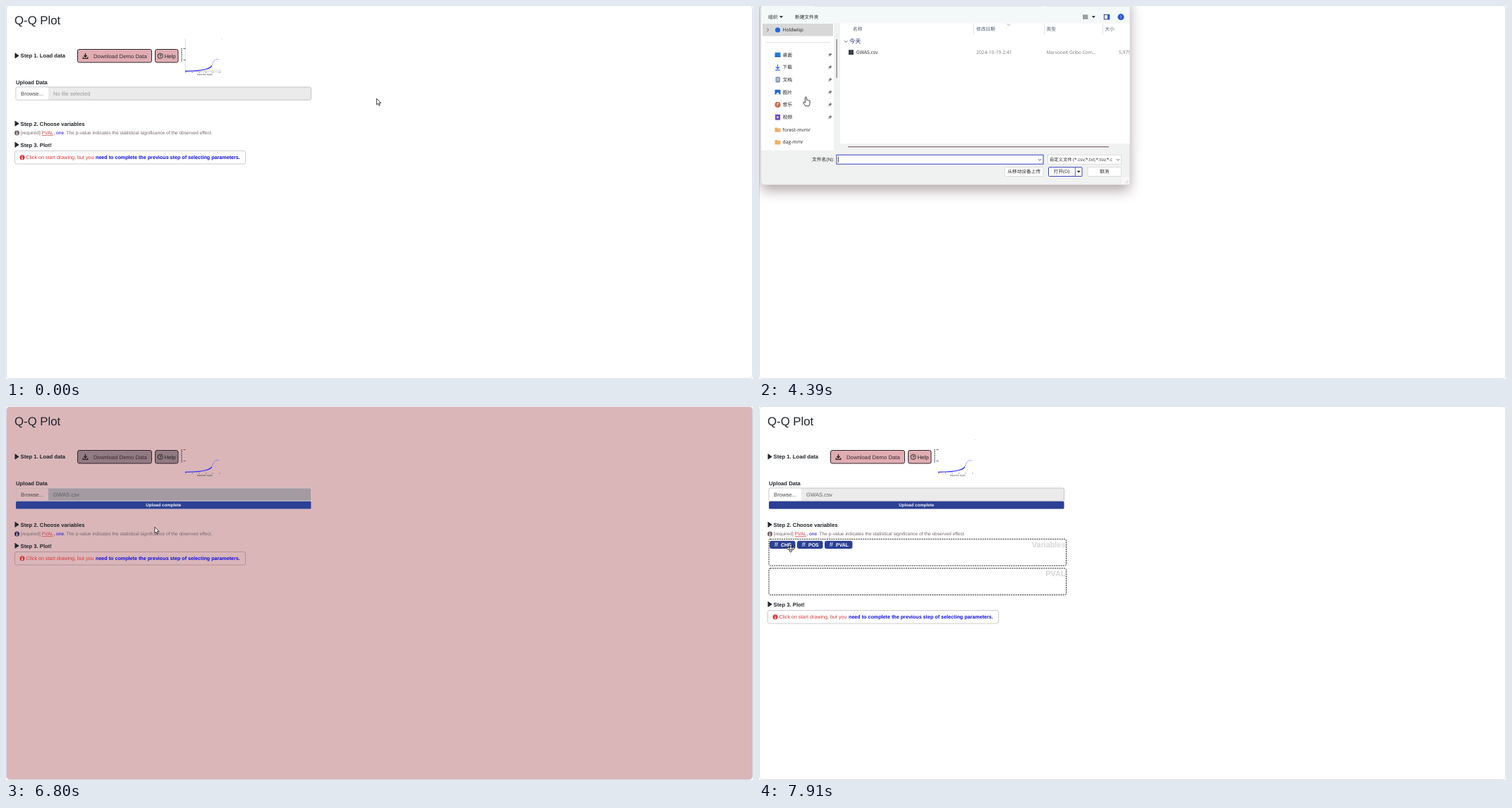
Animation, 1059 px wide and 529 px high, one loop 8 s. Source, as an HTML page:

```html
<!DOCTYPE html>
<html lang="zh-CN">
<head>
<meta charset="utf-8">
<title>Q-Q Plot</title>
<style>
html, body { margin: 0; width: 100%; height: 100%; overflow: hidden; background: #fff; }
svg { display: block; width: 100vw; height: 100vh; }
text { font: 7.7px "Liberation Sans", Arial, sans-serif; fill: #212529; text-rendering: geometricPrecision; white-space: pre; }
.b { font-weight: bold; }
#card { fill: var(--card); stroke: #dcdde0; }
.btn { fill: var(--btn); stroke: #33262b; }
.btnText { font-size: 7.75px; fill: #3a2a30; }
.field { fill: var(--field); stroke: #c4c4c6; }
.tip text { font-size: 6.63px; fill: #77666a; }
.note text { font-size: 7.18px; }
.note .red, .tip .red { fill: #dc3535; }
.note .blue, .tip .blue { fill: #0b0be0; }
.drop { fill: none; stroke: #222; stroke-dasharray: 2 1.2; }
.drop + text { font-size: 10.9px; font-weight: bold; fill: var(--label); text-anchor: end; }
.chip rect { fill: #2c4094; }
.chip text { fill: #fff; font-size: 7px; font-weight: bold; }
.chip .hash { font-size: 9.5px; font-weight: normal; }
.ui text { font: 6.8px "Open Sans", "Noto Sans CJK SC", "Noto Sans CJK", sans-serif; fill: #222; }
.ui .cjk { font-size: 6.7px; }
.ui .dim { fill: #777; }
.ui .head { fill: #4c5a70; font-size: 6.7px; }
.ui .mid { text-anchor: middle; font-size: 6.7px; }
.line { fill: none; stroke: #444; stroke-width: .8; }
.box { fill: #fff; stroke: #d5d5d5; stroke-width: .8; }
.focus { stroke: #3445b5; stroke-width: 1; }
#dialog { transform-origin: 264px 120px; filter: drop-shadow(0 8px 9px rgba(70, 45, 50, .42)); }
#popup { filter: drop-shadow(0 4px 6px rgba(0, 0, 0, .28)); }
.pointer { fill: #fff; stroke: #111; stroke-width: .8; stroke-linejoin: round; }
</style>
</head>
<body>
<svg viewBox="0 0 1059 529" preserveAspectRatio="none">
  <defs>
    <path id="play" d="M12.5 -3.6Q12.5 -4.2 13.1 -3.8L18 -.5Q18.6 0 18 .5L13.1 3.8Q12.5 4.2 12.5 3.6Z" fill="#212529"/>
    <g id="info">
      <circle r="3.5"/>
      <path d="M0 -2.2V-1.2M-.8 -.2H.1V1.9M-1 1.9H1" fill="none" stroke="#fff" stroke-width=".9"/>
    </g>
    <path id="down" d="M-2.2 -1.1L0 1.1 2.2 -1.1" class="line"/>
    <path id="caret" d="M-2.6 -1.3H2.6L0 1.5Z" fill="#222"/>
    <path id="pin" d="M-2.5 2.5L-.8 .8M-1.8 -.6L1 2.1M-.9 -.4L1 -2.3 2.6 -.7 .8 1.1Z" fill="#777" stroke="#777" stroke-width=".8"/>
    <path id="folder" d="M-4 -3H-.8L.3 -2H4V3.3H-4Z" fill="#f2b06a"/>
  </defs>

  <rect id="card" x=".5" y="-.5" width="1058" height="529" rx="5"/>
  <text x="12" y="26" style="font-size:16.8px">Q-Q Plot</text>

  <use href="#play" y="70.4"/>
  <text class="b" x="20.5" y="73.2">Step 1. Load data</text>
  <rect class="btn" x="101.5" y="61.5" width="105" height="18.5" rx="2.5"/>
  <path d="M112.5 67V71.8M110.4 70L112.5 72.2 114.6 70M109.3 72.2V74.4H115.8V72.2" fill="none" stroke="#2b2226" stroke-width="1.3"/>
  <text class="btnText" x="124" y="73.7">Download Demo Data</text>
  <rect class="btn" x="211.5" y="61.5" width="32.5" height="18.5" rx="2.5"/>
  <circle cx="218.7" cy="70.8" r="3.6" fill="none" stroke="#222" stroke-width=".9"/>
  <text class="b" x="216.9" y="73" style="font-size:6px">?</text>
  <text class="btnText" x="224.7" y="73.7" style="fill:#222">Help</text>

  <g id="thumb">
    <path id="axes" d="M254.3 46V93.5H306M254 93L305 91" fill="none" stroke="#c9c9cd" stroke-width=".7"/>
    <path d="M254 92.3Q275 92.3 283 89.8T291.5 85" fill="none" stroke="#2a2aff" stroke-width="1.2"/>
    <path d="M291.5 85L294 79.5Q296 75.8 298 75.8H302" fill="none" stroke="#3a3aff" stroke-dasharray="1 1.3"/>
    <path d="M249 60V79" stroke="#444" stroke-width="1.3" stroke-dasharray="1.6 1"/>
    <path d="M251.5 60.5H254.5M251.5 76.5H254.5" stroke="#555" stroke-width=".9"/>
    <path d="M254 94H305" stroke="#666" stroke-width=".9" stroke-dasharray="1.4 8.2"/>
    <rect x="305.3" y="45.8" width="1" height=".8" fill="#aaa"/>
    <text x="271" y="97.8" style="font-size:2.9px">Expected -log(P)</text>
  </g>

  <text class="b" x="14" y="111.3">Upload Data</text>
  <rect class="field" x="14" y="115" width="418.5" height="18.2" rx="2"/>
  <rect x="14.5" y="115.5" width="45.5" height="17.2" rx="1.5" fill="var(--card)"/>
  <text x="21" y="126.9" style="fill:#44484c">Browse...</text>
  <text id="file" x="67" y="126.9"></text>

  <g id="upload">
    <rect x="14" y="133.7" width="418.5" height="10.8" rx="2" fill="#f1f1f1"/>
    <rect id="bar" x="14" y="133.7" height="10.8" rx="1.5" fill="#2c4094"/>
    <text id="done" class="b" y="141.4" text-anchor="middle" style="font-size:6.2px;fill:#f4f2f6">Upload complete</text>
  </g>
  <g id="import">
    <rect x="191" y="161.2" width="64.5" height="19.3" rx="3" fill="#0b12fb"/>
    <text x="223.2" y="174.5" text-anchor="middle" style="font-size:11.3px;fill:#fff;stroke:#fff;stroke-width:.25px">Import</text>
  </g>

  <g id="step2">
    <use href="#play" y="166.8"/>
    <text class="b" x="20.5" y="169.6">Step 2. Choose variables</text>
    <g class="tip">
      <use id="tipIcon" href="#info" x="15.5" y="180"/>
      <text x="20.8" y="182.3">[required]</text>
      <text class="red" x="50.6" y="182.3" text-decoration="underline">PVAL</text>
      <text class="blue" x="67.4" y="182.3">, one</text>
      <text x="82" y="182.3">. The p-value indicates the statistical significance of the observed effect.</text>
    </g>
  </g>

  <g id="vars">
    <rect class="drop" x="14" y="187.3" width="421.5" height="37.8" rx="2"/>
    <text x="434.5" y="198.7">Variables</text>
    <rect class="drop" x="14" y="228.7" width="421.5" height="37.8" rx="2"/>
    <text x="434.5" y="240.2">PVAL</text>
    <g id="chips" class="chip"></g>
  </g>

  <g id="step3">
    <use href="#play" y="196.8"/>
    <text class="b" x="20.5" y="199.5">Step 3. Plot!</text>
    <rect x="12.5" y="205.5" width="327" height="18.5" rx="2.5" fill="none" stroke="#000" stroke-opacity=".2"/>
    <g class="note">
      <use href="#info" x="23" y="214.8" fill="#dc3535"/>
      <text class="red" x="28.5" y="217.2">Click on start drawing, but you</text>
      <text class="blue b" x="127" y="217.2">need to complete the previous step of selecting parameters.</text>
    </g>
  </g>

  <g id="status" class="ui">
    <path d="M0 517H297Q299.7 517 299.7 519.5V529H0Z" fill="#cdcdd1"/>
    <text x="4" y="525.2" fill="#333">app.invalid:7700/visits/bd05cf91e6b2278e119c5d8b04f62c17/samples/fetch_sample_file?k=</text>
  </g>

  <g id="popup" class="ui">
    <rect x="789" y="-12" width="199.5" height="59" rx="4" fill="#fff"/>
    <path d="M789 16H988.5" stroke="#f0f0f0"/>
    <text class="b" x="798" y="8.8" style="font-size:7.7px;font-weight:bold">下载</text>
    <path class="line" d="M916.8 2.7H920L921.2 3.8H925V9.8H916.8ZM941.9 10L939.6 7.6M971.2 9.5L973 7.7M971.4 5.8L974.9 9.3 975.7 7.2 978.2 5.2 975.5 2.5 973.5 5Z"/>
    <circle class="line" cx="937.6" cy="5.5" r="2.8"/>
    <path d="M952.8 6H960" stroke="#333" stroke-width="1.5" stroke-dasharray="1.5 1.4"/>
    <rect x="798.3" y="27.5" width="6.5" height="6.5" fill="#3a4048"/>
    <text x="811" y="29.2">GWAS.csv</text>
    <text x="811" y="37.7" text-decoration="underline" style="font-size:5.6px;fill:#2b58c0">打开文件</text>
  </g>

  <g id="dialog" class="ui">
    <rect x="3" y="-14" width="522.5" height="267.5" rx="5" fill="#f0f1f1"/>
    <rect x="3" y="0" width="522.5" height="24.5" fill="#f3f8f8"/>
    <path d="M78 .3H401M406 .3H525" stroke="#dfe3e4" stroke-width=".8"/>
    <text class="cjk" x="13" y="18.2">组织</text>
    <use href="#caret" x="31.5" y="15.6"/>
    <text class="cjk" x="51" y="18.2">新建文件夹</text>
    <path d="M459 13.2H466.3M459 15.5H466.3M459 17.8H466.3" stroke="#333" stroke-width="1"/>
    <use href="#caret" x="474.3" y="15.6"/>
    <rect x="489.3" y="12.3" width="7.5" height="6.5" fill="#fff" stroke="#26386f"/>
    <rect x="494" y="12.3" width="2.8" height="6.5" fill="#2f62d8"/>
    <circle cx="513" cy="15.6" r="4.5" fill="#2a55d2"/>
    <text x="511.5" y="18" style="font-size:6px;fill:#fff">?</text>

    <rect x="3" y="24.5" width="103" height="180" fill="#fff"/>
    <rect x="5" y="25" width="100" height="17.6" fill="#d8d8d9"/>
    <path class="line" d="M11.4 31.8L13.6 34 11.4 36.2"/>
    <circle cx="26.5" cy="34" r="3.6" fill="#2468d0"/>
    <text x="33.5" y="36.3">Holdwisp</text>
    <path d="M10 51.8H101" stroke="#ddd"/>
    <g id="places"></g>
    <path d="M110.2 47V102" stroke="#725a5c"/>

    <rect x="115" y="24.5" width="410.5" height="170.8" fill="#fff"/>
    <text class="head" x="133" y="35">名称</text>
    <text class="head" x="308" y="35">修改日期</text>
    <text class="head" x="407.5" y="35">类型</text>
    <text class="head" x="490.5" y="35">大小</text>
    <path d="M304.5 25V40.5M404.5 25V40.5M487.5 25V40.5" stroke="#e2e4e6"/>
    <use href="#down" x="354" y="26.5" opacity=".6"/>
    <use href="#down" x="123.3" y="50.2"/>
    <text x="128" y="53" style="font-size:8.4px;fill:#1f2f6e">今天</text>
    <rect x="127" y="62.2" width="7" height="7" fill="#3a4048"/>
    <text x="137.8" y="68.2">GWAS.csv</text>
    <text class="dim" x="308" y="68.2">2024-10-19 2:41</text>
    <text class="dim" x="407.5" y="68.2" style="font-size:6.5px">Marvonelt Gribo Com...</text>
    <svg x="500" y="58" width="25.5" height="14"><text class="dim" x="10" y="10.2">5,979 KB</text></svg>
    <path d="M126 199.8H496" stroke="#6d4a4d" stroke-width="1.1"/>

    <text x="75" y="220">文件名(N):</text>
    <rect class="box focus" x="110" y="211.2" width="293" height="13"/>
    <path d="M112.6 213.5V222" stroke="#222" stroke-width=".8"/>
    <use href="#down" x="398" y="218"/>
    <rect class="box" x="409.5" y="211.2" width="104" height="13"/>
    <text x="412" y="220" style="font-size:6.3px">自定义文件 (*.csv;*.txt;*.tsv;*.c</text>
    <use href="#down" x="508.8" y="218"/>
    <rect class="box" x="348.5" y="228.7" width="54.5" height="12.8" rx="1"/>
    <text class="mid" x="375.7" y="237.4">从移动设备上传</text>
    <rect class="box focus" x="410.5" y="228.7" width="47.5" height="12.8" rx="1"/>
    <path d="M448.3 229V241.5" stroke="#3445b5" stroke-width=".8"/>
    <text class="mid" x="429" y="237.4">打开(O)</text>
    <use href="#caret" x="453.2" y="235"/>
    <rect class="box" x="466" y="228.7" width="47.5" height="12.8" rx="1"/>
    <text class="mid" x="489.6" y="237.4">取消</text>
    <rect x="514" y="243" width="11" height="10" fill="#f8f8f8"/>
    <path d="M519 251.5L523.5 247M521.5 251.5L523.5 249.5" stroke="#bbb" stroke-width=".8"/>
  </g>

  <g id="pointer">
    <path id="arrow" class="pointer" d="M.4 .3V9L2.4 7.2 3.8 10.2 5.2 9.5 3.9 6.6H6.6Z"/>
    <path id="hand" class="pointer" d="M-1.1 7V1Q-1.1 0 0 0T1.1 1V4.4Q2 3.8 2.8 4.7 3.8 4.2 4.4 5.1 5.6 4.7 5.6 6.2V9.2Q5.6 11 4.4 12.8H-.8Q-1.8 10.8 -3.6 8.8 -4.2 7.4 -3 7.2 -2.2 7.1 -1.1 8.4Z"/>
    <path id="move" class="pointer" d="M0 -5.6L2.1 -3.2H.9V-.9H3.2V-2.1L5.6 0 3.2 2.1V.9H.9V3.2H2.1L0 5.6 -2.1 3.2H-.9V.9H-3.2V2.1L-5.6 0 -3.2 -2.1V-.9H-.9V-3.2H-2.1Z"/>
  </g>
</svg>

<script>
const LOOP = 8000;
const $ = id => document.getElementById(id);
const show = (id, on) => { $(id).style.display = on ? '' : 'none'; };
const shift = (id, x, y) => $(id).setAttribute('transform', `translate(${x} ${y})`);

$('chips').innerHTML = [['CHR', 15, 36.5], ['POS', 54, 36.5], ['PVAL', 93, 39.5]].map(([name, x, w]) =>
  `<rect x="${x}" y="189.8" width="${w}" height="11.2" rx="3"/>
   <text class="hash" x="${x + 6.8}" y="198.4">#</text><text x="${x + 16}" y="197.7">${name}</text>`).join('');

const places = [
  ['桌面', '<rect x="-4" y="-3.3" width="8" height="6.6" rx=".8" fill="#2a7bdc"/><path d="M-4 2.3H4" stroke="#164a9c"/>'],
  ['下载', '<path d="M0 -4V2M-2.6 -.5L0 2 2.6 -.5M-3.3 4H3.3" fill="none" stroke="#2a63c4" stroke-width="1.1"/>'],
  ['文档', '<rect x="-3" y="-4" width="6.4" height="8" rx=".8" fill="#8497b2"/><path d="M-1.5 -1.5H2M-1.5 .5H2" stroke="#fff" stroke-width=".8"/>'],
  ['图片', '<rect x="-4" y="-3.5" width="8" height="7" rx=".8" fill="#2566c8"/><path d="M-3.2 3.5L0 -.4 3.2 3.5Z" fill="#fff"/>'],
  ['音乐', '<circle r="4.1" fill="#cc6a4c"/><path d="M-.4 1.5V-2L1.4 -1.4" fill="none" stroke="#fff" stroke-width=".9"/>'],
  ['视频', '<rect x="-3.6" y="-4" width="7.2" height="8" rx=".8" fill="#7450c0"/><path d="M-1 -1.7L1.7 0 -1 1.7Z" fill="#fff"/>'],
  ['forest-mvmr', '<use href="#folder"/>'],
  ['dag-mmr', '<use href="#folder"/>']
];
$('places').innerHTML = places.map(([name, icon], i) => {
  const y = 69.2 + i * 17.7;
  return `<g transform="translate(26.5 ${y})">${icon}</g><text x="33.5" y="${y + 2.3}">${name}</text>` +
    (i < 6 ? `<use href="#pin" x="100.3" y="${y}"/>` : '');
}).join('');

// Screen updates: first time, last time, count
const ticks = [0, ...[
  [100, 820, 8], [920, 1720, 9], [1820, 1820, 1], [2140, 2140, 1], [2340, 3050, 8], [3150, 3760, 7],
  [4180, 4980, 9], [5080, 5880, 9], [5980, 6710, 8], [6800, 7500, 8], [7620, 7910, 4]
].flatMap(([a, b, n]) => Array.from({ length: n }, (_, i) => a + (n > 1 ? (b - a) * i / (n - 1) : 0)))];
const snap = t => ticks.filter(k => k <= t + .5).pop();

// Pointer route: time, x, y
const route = [
  [0, 525, 131], [820, 240, 90], [1420, 160, 74], [2340, 160, 74], [3050, 64, 115], [3450, 66.5, 129],
  [4500, 66.5, 129], [4980, 150, 66], [5300, 150, 66], [5880, 115, 160], [5980, 113, 167],
  [6084, 119, 167.5], [6605, 210.5, 170], [7200, 210.5, 170], [7500, 176, 182], [7810, 45, 200.5], [LOOP, 45, 200.5]
];
function along(t) {
  const i = Math.max(1, route.findIndex(p => p[0] >= t));
  const [a, b] = [route[i - 1], route[i]];
  const k = (t - a[0]) / (b[0] - a[0]);
  return [a[1] + (b[1] - a[1]) * k, a[2] + (b[2] - a[2]) * k];
}

// CSS "ease" curve
function ease(x) {
  if (x <= 0 || x >= 1) return x <= 0 ? 0 : 1;
  const bez = (s, p, q) => 3 * s * (1 - s) ** 2 * p + 3 * s * s * (1 - s) * q + s ** 3;
  let lo = 0, hi = 1;
  for (let i = 0; i < 20; i++) {
    const m = (lo + hi) / 2;
    if (bez(m, .25, .25) < x) lo = m; else hi = m;
  }
  return bez(lo, .1, 1);
}

const themes = {
  plain: { card: '#fff', btn: '#e0adb3', field: '#ebebeb', label: '#d6d6d8' },
  rose: { card: '#dab6b9', btn: '#927a82', field: '#a39aa2', label: '#c0a0a6' },
  grey: { card: '#c8c9cb', btn: '#9690a0', field: '#dab3b8', label: '#bba3a9' },
  pale: { card: '#e6e6e8', btn: '#c0a0aa', field: '#d6d4d7', label: '#c9c0c4' }
};
const themeAt = t => t < 6790 || t > 7290 ? 'plain' : t < 6990 ? 'rose' : t < 7190 ? 'grey' : 'pale';

function draw(time) {
  const t = snap(time);
  const within = (a, b) => t >= a && t < b;
  const uploaded = t >= 5670, importing = within(5670, 6790), chosen = t >= 6990;

  const theme = themes[themeAt(t)];
  for (const key in theme) document.documentElement.style.setProperty('--' + key, theme[key]);
  $('tipIcon').setAttribute('fill', themeAt(t) === 'plain' ? '#77666a' : '#3a2a5c');

  show('axes', t < 100);
  $('file').textContent = uploaded ? 'GWAS.csv' : 'No file selected';
  $('file').style.fill = uploaded ? '#5c5f63' : '#97999c';

  const width = 418.5 * ease((t - 5635) / 600);
  $('bar').setAttribute('width', width);
  $('done').setAttribute('x', 14 + width / 2);
  show('upload', uploaded);
  show('import', importing);
  show('vars', chosen);
  shift('step2', 0, importing ? 30.4 : 0);
  shift('step3', 0, importing ? 30.4 : chosen ? 83 : 0);

  show('status', within(1210, 3240));
  $('status').style.opacity = t < 1310 ? .5 : 1;
  show('popup', within(2430, 3440));
  $('popup').style.opacity = t < 2530 ? .6 : 1;

  const grow = Math.min(1, (t - 4080) / 250);
  const fade = within(5270, 5370) ? .4 : 1;
  show('dialog', within(4170, 5370));
  $('dialog').style.opacity = Math.min(grow, fade);
  $('dialog').style.transform = `scale(${.94 + .06 * Math.min(grow, fade)})`;

  const [x, y] = along(t);
  const kind = t >= 7690 ? 'move'
    : within(1110, 2600) || within(3240, 4570) || within(6490, 6790) ? 'hand' : 'arrow';
  for (const k of ['arrow', 'hand', 'move']) show(k, k === kind);
  shift('pointer', x, y);
}

const start = performance.now();
function frame() {
  draw((performance.now() - start) % LOOP);
  requestAnimationFrame(frame);
}
frame();
</script>
</body>
</html>
```
